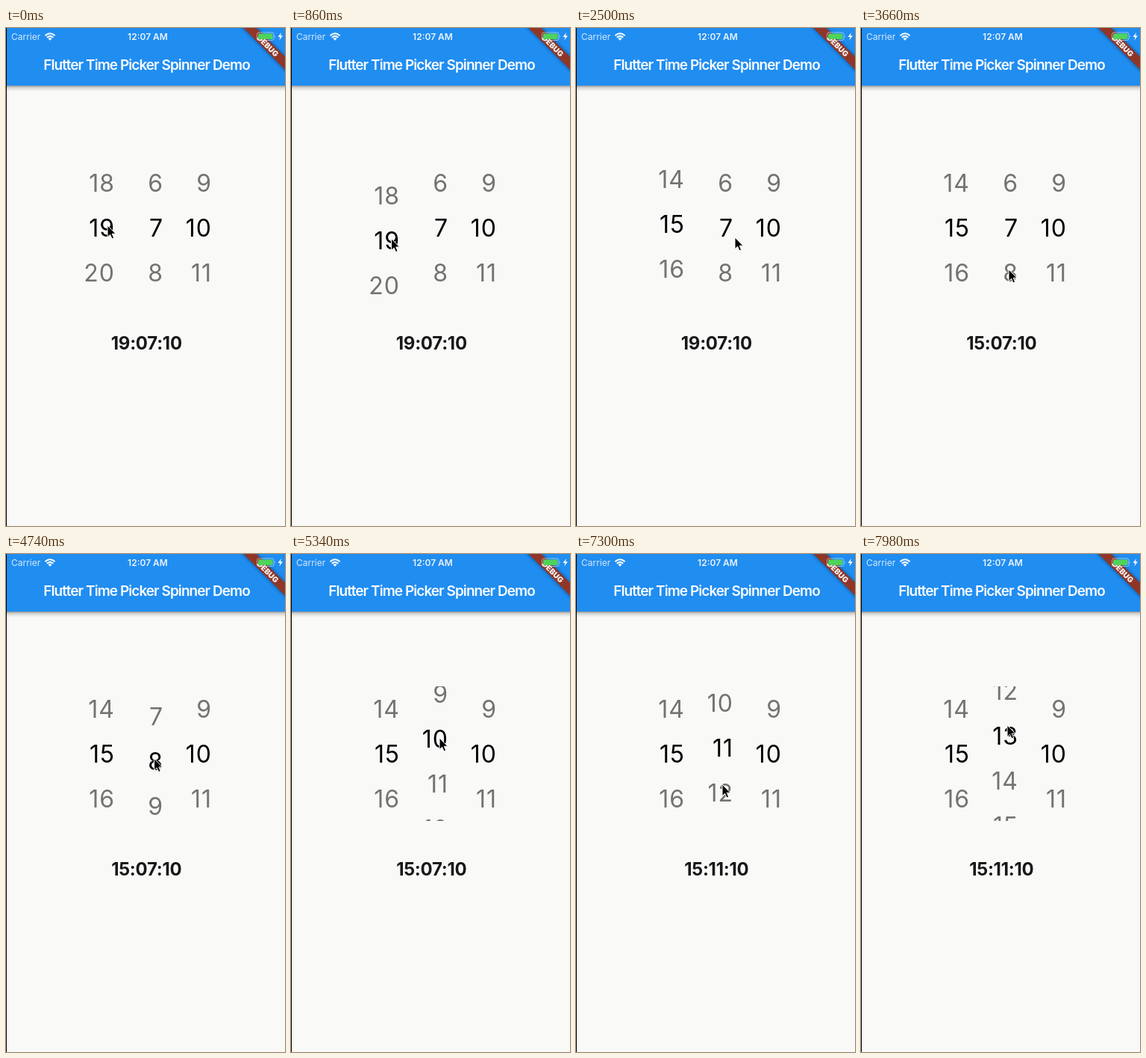
Recreate the animation shown at these times as an HTML page. Size 374 by 666 pixels, loop 8000 ms.

```html
<!DOCTYPE html>
<html lang="en">
<head>
<meta charset="utf-8">
<title>Time Picker Spinner</title>
<style>
  html, body { margin: 0; width: 100%; height: 100%; overflow: hidden; background: #f9f9f8; }
  svg { display: block; width: 374px; height: 666px; font-family: Inter, "Open Sans", sans-serif; }
  .wheel { font-size: 32px; letter-spacing: 1px; text-anchor: end; }
</style>
</head>
<body>
<svg viewBox="0 0 374 666">
  <defs>
    <linearGradient id="shade" x2="0" y2="1">
      <stop offset="0" stop-color="#333" stop-opacity=".5"/>
      <stop offset=".35" stop-color="#555" stop-opacity=".22"/>
      <stop offset="1" stop-color="#777" stop-opacity="0"/>
    </linearGradient>
    <filter id="blur" x="-20%" y="-80%" width="140%" height="260%"><feGaussianBlur stdDeviation="2.5"/></filter>
    <clipPath id="window"><rect x="90" y="177" width="200" height="180"/></clipPath>
  </defs>

  <rect width="374" height="666" fill="#f9f9f8"/>
  <rect y="77" width="374" height="8" fill="url(#shade)"/>
  <rect width="374" height="77" fill="#208df1"/>

  <g fill="#eaf3fc">
    <text x="7" y="16" font-size="12" fill="#d6e8fa">Carrier</text>
    <path d="M52.4 10.2Q59 4.2 65.6 10.2M54.8 12.8Q59 9 63.2 12.8" fill="none" stroke="#f4f9fd" stroke-width="2"/>
    <path d="M56.5 14.2Q59 12 61.5 14.2L59 16.8Z" fill="#f4f9fd"/>
    <text x="190" y="16" font-size="12" font-weight="600" text-anchor="middle">12:07 AM</text>
  </g>
  <text x="188.5" y="56" font-size="19" font-weight="600" letter-spacing="-.95" text-anchor="middle" fill="#f8fbfe">Flutter Time Picker Spinner Demo</text>

  <g transform="translate(375 0) rotate(45)">
    <rect x="-44" y="28" width="88" height="12" fill="#000" opacity=".5" filter="url(#blur)"/>
    <rect x="-44" y="28" width="88" height="12" fill="#8f3628"/>
    <text y="37.7" font-size="10.2" font-weight="900" text-anchor="middle" fill="#f6eeec">DEBUG</text>
  </g>
  <rect x="336.5" y="6" width="22.5" height="10.5" rx="2.5" fill="none" stroke="#dfe8f2" stroke-opacity=".6"/>
  <rect x="338" y="7.5" width="19.5" height="7.5" rx="1.5" fill="#4fd35b"/>
  <path d="M360.3 9.5q1.8 1.7 0 3.5z" fill="#dfe8f2" opacity=".7"/>
  <path d="M369 6L364.5 12H367.4L366.4 16.5L371 10.3H368Z" fill="#f4f9fd"/>

  <g id="wheels" class="wheel" clip-path="url(#window)"></g>
  <text id="time" x="188.3" y="430.3" font-size="24" font-weight="700" letter-spacing="-.3" text-anchor="middle" fill="#181818"></text>
  <path id="cursor" d="M0 0V15.5L3.6 12.2L6 17.8L8.6 16.7L6.2 11.2H11Z" fill="#000" stroke="#fff" stroke-width="1" stroke-linejoin="round"/>
  <rect width="1" height="666" fill="#000"/>
</svg>

<script>
const LOOP = 8000, ROW = 60, MID = 267;
const FPS = 60, SLOW = 9.07, FAST = 22.04;  // overdamped spring rates, per second
const FLING = 3, REST = 0.0083;
const $ = id => document.getElementById(id);

// Times below are ticks of a 60 Hz clock that plays with uneven holds: 20, 100, 20 ms
function tickAt(ms) {
  const phase = ms % 140;
  return 3 * Math.floor(ms / 140) + (phase < 20 ? 0 : phase < 120 ? 1 : 2);
}

const smooth = p => p * p * (3 - 2 * p);
const speedUp = p => p * p;
const progress = (m, n) => Math.min(1, Math.max(0, (n - m.start) / (m.end - m.start)));

// A drag speeds up until release; the wheel then springs about three rows on
function makeDrag(start, end, a, b, from) {
  const rows = (a[1] - b[1]) / ROW;
  const held = from + rows;
  const to = Math.round(held + FLING * Math.sign(rows));
  const speed = 2 * rows / (end - start) * FPS;
  const fast = (speed - SLOW * (to - held)) / (FAST - SLOW);
  return { start, end, a, b, from, to, rows, fast, slow: to - held - fast, ease: speedUp };
}
const makeMove = (start, end, a, b) => ({ start, end, a, b, ease: smooth });

const hourDrag = makeDrag(12, 26, [136, 264], [130, 335], 19);
const minuteDrag = makeDrag(89.8, 103.8, [198, 323], [199, 246], 7);
const nextDrag = makeDrag(152.8, 166.8, [196, 316], [196, 229], minuteDrag.to);
const path = [
  hourDrag,
  makeMove(33, 52, hourDrag.b, [213, 280]),
  makeMove(55, 76, [213, 280], minuteDrag.a),
  minuteDrag,
  makeMove(133, 147, minuteDrag.b, nextDrag.a),
  nextDrag
];

function pointer(n) {
  let m = path[0];
  for (const next of path) if (n >= next.start) m = next;
  const p = m.ease(progress(m, n));
  return m.a.map((v, i) => v + (m.b[i] - v) * p);
}

function spin(d, n) {
  if (n <= d.end) return d.from + d.rows * d.ease(progress(d, n));
  const s = (n - d.end) / FPS;
  const left = d.slow * Math.exp(-SLOW * s) + d.fast * Math.exp(-FAST * s);
  return Math.abs(left) < REST ? d.to : d.to - left;
}

function makeWheel(x, size) {
  const rows = Array.from({ length: 5 }, () => {
    const el = document.createElementNS("http://www.w3.org/2000/svg", "text");
    el.setAttribute("x", x);
    return $("wheels").appendChild(el);
  });
  return pos => {
    const near = Math.round(pos);
    rows.forEach((el, i) => {
      const value = near + i - 2;
      el.textContent = (value + size) % size;
      el.setAttribute("y", MID + 11.5 + (value - pos) * ROW);
      el.setAttribute("fill", value === near ? "#000" : "#737372");
    });
  };
}

const setHour = makeWheel(146, 24);
const setMinute = makeWheel(211, 60);
const setSecond = makeWheel(276, 60);
const pad = v => String(v).padStart(2, "0");
const settled = (d, pos) => pos === d.to ? d.to : d.from;

function draw(ms) {
  const n = tickAt(ms);
  const drag = n < nextDrag.start ? minuteDrag : nextDrag;
  const hour = spin(hourDrag, n), minute = spin(drag, n);
  setHour(hour);
  setMinute(minute);
  setSecond(10);
  $("time").textContent = [settled(hourDrag, hour), settled(drag, minute), 10].map(pad).join(":");
  $("cursor").setAttribute("transform", `translate(${pointer(n)})`);
}

const began = performance.now();
function loop() {
  draw((performance.now() - began) % LOOP);
  requestAnimationFrame(loop);
}
loop();
</script>
</body>
</html>
```
